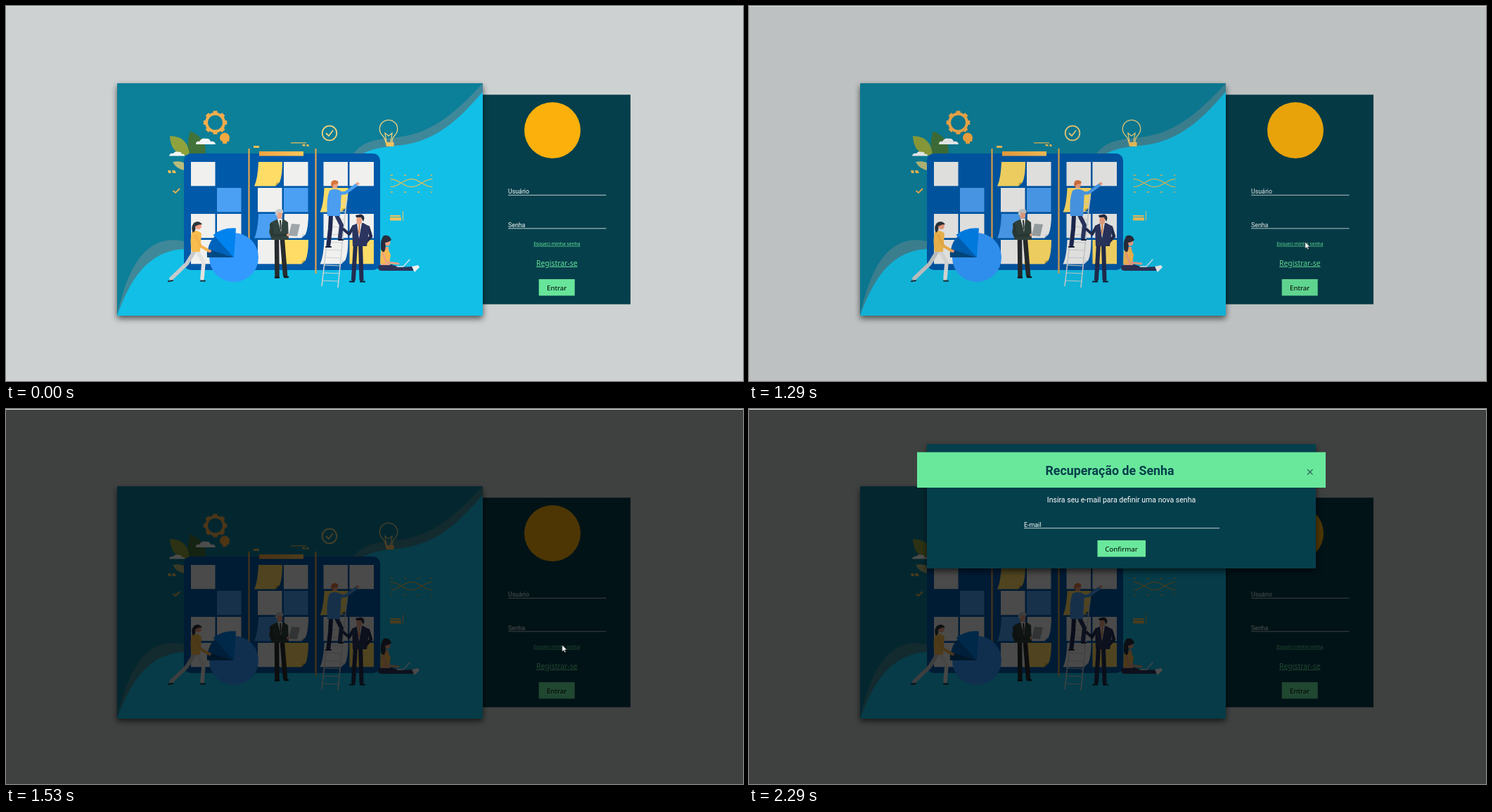
An HTML page for the animation above (2.61 s loop, 1048 by 534 pixels).

```html
<!DOCTYPE html>
<html lang="pt-BR">
<head>
<meta charset="utf-8">
<title>Recuperação de Senha</title>
<style>
  html, body { margin: 0; width: 100%; height: 100%; overflow: hidden; background: #cdd1d1; }
  svg { display: block; width: 1048px; height: 534px; }
  text { font-family: Roboto, sans-serif; }
  .alt { font-family: "Noto Sans", "Open Sans", sans-serif; }
  .mid { text-anchor: middle; }
  .link { fill: #67e59a; text-decoration: underline; }
  .card { filter: drop-shadow(0 4px 4.5px rgba(0, 0, 0, .6)); }
  .limb { fill: none; stroke-linecap: round; stroke-linejoin: round; }
  .thin { fill: none; stroke: #f0d27c; stroke-width: 1.3; }
  .bold { stroke-width: 1.8; }
</style>
</head>
<body>
<svg viewBox="0 0 1048 534">
  <defs>
    <linearGradient id="amber"><stop stop-color="#f2a23f"/><stop offset="1" stop-color="#ffc65c"/></linearGradient>
  </defs>
  <rect width="1048" height="534" fill="#cdd1d1"/>

  <!-- login panel -->
  <rect x="670" y="126.300" width="218" height="298.400" fill="#053f4b"/>
  <circle cx="777" cy="177" r="40" fill="#fbb00c"/>
  <g fill="#fff" font-size="8.8">
    <text x="714" y="267">Usuário</text>
    <text x="714" y="314.500">Senha</text>
    <path d="M714 269.300H853.500M714 316.800H853.500" stroke="#d5dfe1" stroke-width=".9"/>
  </g>
  <text class="alt mid link" x="783.3" y="340.800" font-size="6.7">Esqueci minha senha</text>
  <text class="alt mid link" x="783.3" y="369.800" font-size="10.4">Registrar-se</text>
  <rect x="757.700" y="389" width="51" height="23.500" fill="#67e59a"/>
  <text class="alt mid" x="783.2" y="404.500" font-size="9.75">Entrar</text>

  <!-- illustration card -->
  <rect class="card" x="158" y="110" width="520" height="331" fill="#0c7f99"/>
  <path fill="#3f8899" d="M158 441C172 379 195 323 253 335L494 210C510 190 530 190 556 187C612 181 648 142 678 110V441Z"/>
  <path fill="#12bfe7" d="M158 441C176 392 200 349 253 346L506 211C526 200 545 201 570 197C620 188 652 152 678 122V441Z"/>

  <!-- plants and clouds -->
  <path fill="#41733a" d="M262 178Q288 190 283 212H261Q256 194 262 178Z"/>
  <path fill="#8fa23c" d="M233 185Q259 185 261 213Q234 213 233 185Z"/>
  <path fill="#b9bd7c" d="M237 222Q248 220 254 224V234Q242 232 237 222Z"/>
  <g fill="#f2f5f5">
    <path d="M270 197Q270 192 275 193Q278 187 285 189Q289 188 291 193Q297 192 298 197Z"/>
    <path d="M232 213.500Q233 209 238 210Q240 206 246 208Q249 207 250 211Q254 210 254 213.500Z"/>
  </g>

  <!-- icons -->
  <g id="gear"><circle cx="297.500" cy="166" r="12.500" fill="none" stroke="#f5ad4c" stroke-width="4"/></g>
  <path fill="#f7a941" d="M304 187A7 7 0 1 1 318 188L317 193L314 193V196H308V193Q304 192 304 187Z"/>
  <g class="thin bold">
    <circle cx="460" cy="181" r="10.300"/>
    <path d="M455 181L459 185L465 177"/>
    <path d="M237.500 263L241 266L247 260" stroke="#f0b04e"/>
  </g>
  <g class="thin">
    <path d="M540 194Q539 188 535 184A12.700 12.700 0 1 1 553 184Q549 188 549 194M541 194L539 181L544 185L549 181L547 194"/>
    <path id="waves" stroke="#d5bd62"/>
    <path d="M547 241H606M547 265H606" stroke="#e6b955" stroke-dasharray="3 16"/>
    <path d="M547 241V265M606 241V265" stroke="#cdbb6b" stroke-width=".7" stroke-dasharray="1 3"/>
  </g>
  <path fill="#f3c25d" d="M539.500 194H551.500L551.500 200H541ZM546 298H561V300H546ZM546 301H562V305.500H546ZM564 292H565V305.500H564Z"/>
  <path fill="#f0bd55" d="M352 199H360V202H352ZM405 194.300H427V195.600H405ZM421 197H425L426 199.500H422ZM427 197H430L431 200H428ZM230 234H234L235 238H231ZM236 234H240L242 238H237Z"/>

  <!-- board -->
  <rect x="253" y="210" width="279" height="166" rx="10" fill="#0059a9"/>
  <g id="notes"></g>
  <path d="M345.500 203V376M440.500 203V381" stroke="#e6a54c" stroke-width="2.200"/>
  <rect x="360" y="207" width="63" height="6.500" fill="url(#amber)"/>

  <!-- woman pushing the chart -->
  <g class="limb">
    <path d="M268 349L257 367L235 388" stroke="#c8cacb" stroke-width="5.500"/>
    <path d="M272 349L281 365L279 388" stroke="#e2e2e0" stroke-width="5.500"/>
    <path d="M231 392L237 391M277 391.500H283" stroke="#25303a" stroke-width="2"/>
  </g>
  <path fill="#f8bd4f" d="M264 322Q271 317 278 324L276 350H264Q261 334 264 322Z"/>
  <circle cx="273.500" cy="313.500" r="4.500" fill="#f1a183"/>
  <path fill="#2c343c" d="M279 311Q274 304 267 309Q262 316 266 323Q271 319 269 314Q273 311 279 311Z"/>

  <!-- pie chart -->
  <circle cx="324" cy="358" r="35" fill="#3399ff"/>
  <path fill="#0083ee" d="M324 358L294.500 326Q308 315 327 316.500Z"/>
  <path fill="#0063bb" d="M324 358L297 328Q289 335 287 347Z"/>
  <path fill="#004a82" d="M324 358L287 346Q285 352 286 358Z"/>
  <path class="limb" d="M269 327L277 342L289 349" stroke="#f4b34b" stroke-width="3.800"/>
  <circle cx="290" cy="349" r="2" fill="#f1a183"/>

  <!-- man with a laptop -->
  <g class="limb">
    <path d="M385 334L385.500 384M393 334L397 383" stroke="#272b2d" stroke-width="6.500"/>
    <path d="M383 386.500H388M396 386H401" stroke="#17191b" stroke-width="2.500"/>
  </g>
  <path fill="#32443f" d="M377 308L387 303H394L401 308L402 333H378L374 322Z"/>
  <path fill="#eef0ee" d="M386 303H393L391 322Z"/>
  <path fill="#26302e" d="M389 305H391L391.500 316L390 320Z"/>
  <path class="limb" d="M377 311L379 327L399 326" stroke="#2a3a36" stroke-width="4"/>
  <path fill="#9ea6a9" d="M406 310L418 311L414 328L402 327Z"/>
  <circle cx="401" cy="326" r="2" fill="#eca283"/>
  <rect x="385" y="291" width="8" height="12" rx="4" fill="#eca283"/>
  <path fill="#c8cacb" d="M383 297Q382 289 389 289Q396 289 394 295L387 294L386 299Z"/>

  <!-- ladder and climber -->
  <g stroke="#cdd2d3" fill="none">
    <path d="M449 399L464 270M472 401L485 270" stroke-width="1.600"/>
    <path id="rungs" stroke-width="1.200"/>
  </g>
  <g class="limb">
    <path d="M462 298L461 318L458.500 340" stroke="#1e2850" stroke-width="6"/>
    <path d="M470 298L477 312L475 329" stroke="#2a3561" stroke-width="6"/>
    <path d="M455 343H462M473 333H479" stroke="#151c33" stroke-width="2.200"/>
    <path d="M473 267L483 266L498 255" stroke="#4c9ff0" stroke-width="4.500"/>
  </g>
  <path fill="#4b9df0" d="M460 263Q468 258 477 264L475 299H457Q455 275 460 263Z"/>
  <ellipse cx="500" cy="253" rx="2.500" ry="2" fill="#eca283"/>
  <circle cx="467.500" cy="255" r="4.500" fill="#eca283"/>
  <path fill="#d8743e" d="M462.500 256Q461 248 468 248Q474 249 472 253L466 254L464 258Z"/>

  <!-- man in a navy suit -->
  <g class="limb">
    <path d="M497 338L494 389M504 338L505.500 389" stroke="#222c50" stroke-width="6"/>
    <path d="M489 392.500H495M504 392.500H510" stroke="#161c30" stroke-width="2.200"/>
    <path d="M494 314L488 325L480 318" stroke="#222c50" stroke-width="4"/>
    <path d="M515 315L519 328L511 337" stroke="#222c50" stroke-width="4.500"/>
  </g>
  <path fill="#2b355f" d="M492 313L500 309H508L517 314L513 342H493Z"/>
  <path fill="#f1f1f1" d="M499 309H506L502 331Z"/>
  <path fill="#e58745" d="M501.500 311H503.500L503 326L501 322Z"/>
  <rect x="498.500" y="299" width="7.500" height="12" rx="3.700" fill="#eca283"/>
  <path fill="#262d3f" d="M497 298L505 296.500Q512 299 508 307L505 301L498 301Z"/>

  <!-- seated woman -->
  <path fill="#2d3358" d="M530 369L548 368L560 372L579 371V377H534Q527 377 530 369Z"/>
  <path fill="#eca283" d="M535 343H544L546 369H533Z"/>
  <path fill="#f7ba50" d="M533 348L543 346L547 354L545 367H532Z"/>
  <path class="limb" d="M536 352L541 365L558 367" stroke="#eca283" stroke-width="2.800"/>
  <path class="limb" d="M556 371H565L574 361" stroke="#dce5e9" stroke-width="1.300"/>
  <path fill="#f1f1f1" d="M577 371L586 369L588 372L581 379Z"/>
  <circle cx="542" cy="337" r="4.600" fill="#eca283"/>
  <path fill="#282c3d" d="M548 333Q545 325 537 327Q532 333 533 345Q534 351 538 350Q541 343 539 337Q545 336 548 333Z"/>

  <rect id="dim" width="1048" height="534" opacity="0"/>

  <!-- password dialog -->
  <g id="dialog" opacity="0">
    <rect class="card" x="253" y="50" width="553" height="177" fill="#053f4c"/>
    <rect x="239" y="61.500" width="581" height="50.500" fill="#69e89c"/>
    <text class="mid" x="513" y="94" font-size="17.800" font-weight="700" fill="#063f4b">Recuperação de Senha</text>
    <path d="M794 86L801.500 93.500M801.500 86L794 93.500" stroke="#2c6351" stroke-width="1.100"/>
    <text class="mid" x="529.500" y="132.500" font-size="10.560" fill="#fff">Insira seu e-mail para definir uma nova senha</text>
    <text x="391" y="168.300" font-size="8.900" fill="#fff">E-mail</text>
    <path d="M391 169.700H669" stroke="#d5dfe1" stroke-width=".9"/>
    <rect x="495.500" y="187" width="68.500" height="23.500" fill="#69e89c"/>
    <text class="alt mid" x="529.500" y="202.500" font-size="9.750">Confirmar</text>
  </g>

  <rect width="1048" height="1" fill="#dfe2e2"/>

  <path id="arrow" fill="#fff" stroke="#111" stroke-width=".5" d="M0 0V9.500L2.200 7.500L3.700 10.800L5.200 10.100L3.800 6.900H6.800Z"/>
  <g id="hand">
    <path transform="scale(.87)" fill="#fff" stroke="#222" stroke-width=".6" d="M3.500 1.500Q4.700 0 5.800 1.500V6L10 7Q11.500 7.500 11.300 9.500L10 13.500V15.500H4.500L.800 10.500Q0 8.500 1.700 8.700L3.500 10Z"/>
  </g>
</svg>
<script>
const LOOP = 2610;
const $ = id => document.getElementById(id);

// Board notes by row: colour letter, "s" marks a curled sticky note
const cols = [263, 300, 358, 395, 451.5, 488.5];
const rows = [222, 259, 296, 333];
const fills = { w: '#f0f0ef', b: '#4ca0f4', y: '#ffdc66' };
const folds = { w: '#cfd3d6', b: '#2f7fd4', y: '#c9a93c' };
const plan = [
  ['w', '', 'ys', 'w', 'w', 'w'],
  ['', 'b', 'w', 'b', 'ys', ''],
  ['w', 'w', 'bs', 'ws', 'w', 'w'],
  ['w', 'w', 'w', 'ys', 'ws', 'y']
];
const note = (x, y, [c, curl]) => curl
  ? `<path fill="${fills[c]}" d="M${x + 1} ${y}h34q0 20-4 29l-6 5.500h-30q5-10 6-34.500z"/>` +
    `<path fill="${folds[c]}" d="M${x + 31} ${y + 29}l-6 5.500l1.500-5z"/>`
  : `<rect x="${x}" y="${y}" width="34.5" height="34.300" fill="${fills[c]}"/>`;
$('notes').innerHTML = plan.map((line, r) =>
  line.map((kind, c) => kind && note(cols[c], rows[r], kind)).join('')).join('');

$('gear').innerHTML += Array.from({ length: 8 }, (_, i) =>
  `<rect x="294.500" y="149.300" width="6" height="4.500" fill="#f5ad4c" transform="rotate(${i * 45} 297.500 166)"/>`).join('');

const wave = sign => 'M' + Array.from({ length: 60 }, (_, i) =>
  `${547 + i} ${(252 + sign * 5.5 * Math.cos(i / 59 * Math.PI * 2)).toFixed(2)}`).join('L');
$('waves').setAttribute('d', wave(1) + wave(-1));

$('rungs').setAttribute('d', Array.from({ length: 11 }, (_, i) => {
  const y = 281 + i * 11, k = (y - 270) / 130;
  return `M${464 - 15 * k} ${y}L${485 - 13 * k} ${y + 1}`;
}).join(''));

// Each step holds until the next one
function play(id, steps, frame) {
  const keys = steps.map(([t, ...v]) => ({ offset: t / LOOP, easing: 'step-end', ...frame(...v) }));
  keys.push({ ...keys[keys.length - 1], offset: 1 });
  $(id).animate(keys, { duration: LOOP, iterations: Infinity });
}
const at = (x = -50, y = -50) => ({ transform: `translate(${x}px, ${y}px)` });

play('arrow', [
  [0], [130, 984, 518], [210, 925, 447], [290, 858, 382], [360, 812, 346], [440, 791, 334],
  [760], [830, 790.7, 336], [1750, 828, 350], [1830, 892, 387], [1910, 926, 423],
  [1980, 950, 461], [2060, 968, 495], [2140, 981, 524], [2220, 1006, 525], [2290]
], at);

play('hand', [[0], [760, 787, 333.5], [830]], at);

play('dim', [
  [0, 0], [1140, .01], [1210, .03], [1290, .073], [1370, .26], [1450, .5], [1530, .69]
], opacity => ({ opacity }));

play('dialog', [
  [0, 0, -50], [1680, .4, -32], [1750, .88, -7], [1830, 1, 0]
], (opacity, y) => ({ opacity, ...at(0, y) }));
</script>
</body>
</html>
```
